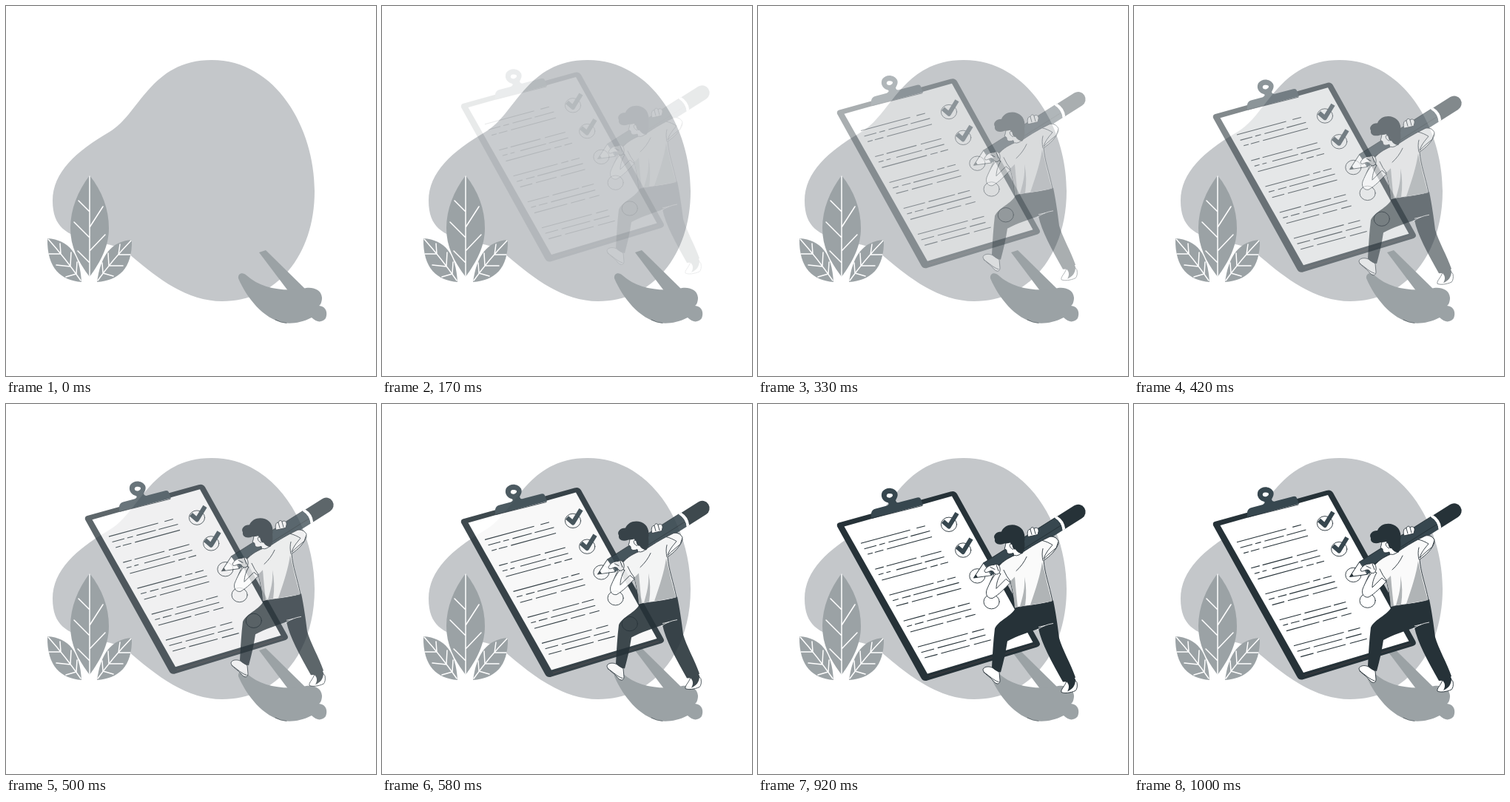
Recreate the animation shown at these times as an HTML page. Size 500 by 500 pixels, loop 1040 ms.

```html
<!DOCTYPE html>
<html lang="en">
<head>
<meta charset="utf-8">
<title>Checklist</title>
<style>
html, body { margin: 0; height: 100%; overflow: hidden; background: #fff; }
svg { display: block; width: 100%; height: 100%; }
.ink { fill: #263238; }
.slate { fill: #37474f; }
.leaf { fill: #9ba2a5; }
.vein { fill: none; stroke: #fff; stroke-width: 1.5; stroke-linecap: round; }
.line { fill: none; stroke: #263238; stroke-width: .9; stroke-linecap: round; stroke-linejoin: round; }
.skin { fill: #fff; stroke: #263238; stroke-width: .9; stroke-linejoin: round; }
.shade { fill: #b0b4b6; }
</style>
</head>
<body>
<svg viewBox="0 0 500 500">
  <path fill="#c4c7ca" d="M278 73C365 73 417 165 417 250C417 338 365 399 292 399C245 399 205 368 172 340C155 324 140 322 115 318C82 309 63 299 63 263C63 225 95 196 140 170C180 147 195 73 278 73Z"/>

  <g class="leaf">
    <path d="M113 229C130 250 139 275 139 300C139 325 128 345 113 366C97 345 87 325 87 300C87 275 97 250 113 229Z"/>
    <path d="M56 314C85 316 100 335 102 373C75 371 55 355 56 314Z"/>
    <path d="M170 316C142 318 128 337 123 373C152 371 171 355 170 316Z"/>
    <path d="M342 333L351 330L405 383L382 386Z"/>
    <path d="M314 368C313 361 320 359 325 364C345 382 375 386 402 382C410 379 426 381 427 394C427 400 425 404 423 405C433 406 435 415 432 422C427 428 420 428 413 421C400 428 385 430 375 428C348 423 325 394 314 368Z"/>
  </g>
  <path class="line" d="M364 424Q371 428 379 428.500" style="stroke-width:.5"/>
  <g class="vein">
    <path d="M113 230V366M98 263L113 278M92 292L113 313M97 331L113 347M131 271L113 299M134 309L113 331"/>
    <path d="M57 315Q81 342 101 371M73 321L74 335M88 333L87 351M96 346L95 362M58 335L74 335M68 350L87 352M81 366L95 362"/>
    <path d="M169 317Q144 343 124 371M154 322L152 336M138 334L139 351M130 347L131 361M168 336L152 336M158 351L139 351M145 365L131 361"/>
  </g>

  <g class="drop">
    <path class="ink" d="M109 159L260 117Q266 115 269 120L380 320Q383 325 377 327L229 372Q223 374 220 368L107 164Q106 160 109 159Z"/>
    <path fill="#fff" d="M116.500 164L262 123L371.500 320.500L229 363Z"/>
    <path d="M231 367L374 324" fill="none" stroke="#4a4346" stroke-width=".7"/>
    <path class="slate" fill-rule="evenodd" d="M153 153L153 146Q154 141 159 140L174 136Q178 134 176 132C168 130 165 123 168 117C173 110 184 111 188 118C190 123 187 126 186 129Q187 133 192 131L215 125Q219 124 220 127L223 135ZM175 120C172 123 175 126 179 125C184 123 183 118 175 120Z"/>
    <path class="line" d="M154 153L222 136"/>
    <g id="rows" class="line"></g>
    <g id="rings" class="line"></g>
    <g fill="none" stroke="#37474f" stroke-width="6" stroke-linejoin="round">
      <path id="tick" d="M250 157L258 164L269 146"/>
      <use href="#tick" x="19" y="34.500"/>
    </g>
  </g>

  <g class="drop">
    <g transform="translate(291.500 233.500) rotate(-32.300)">
      <path class="skin" d="M0 0L22 -10V10Z"/>
      <path class="ink" d="M0 0L5 -2.300V2.300ZM138 -10H167A10 10 0 0 1 167 10H138Q143 0 138 -10Z"/>
      <path class="slate" d="M21 -10H136Q141 0 136 10H21Q25 5 21 2Q24 -4 21 -10Z"/>
      <path class="line" d="M24 3H137M22 -10H136"/>
      <path fill="#fff" d="M136 -10H140Q145 0 140 10H136Q141 0 136 -10Z"/>
    </g>

    <path class="skin" d="M365 178C363 172 365 167 368 168C369 164 373 165 373 167C376 164 380 167 379 171L378 175Z"/>
    <path class="line" d="M368 168L370 175M373 167L375 174"/>

    <path class="skin" d="M336 183C334 188 335 190 333 194L336 196C336 201 339 202 345 200L347 208L360 202L356 180Z"/>
    <path class="skin" d="M425 367L431 375C432 380 431 384 429 386C422 389 414 390 410 388C409 384 414 381 417 373Z"/>
    <path class="ink" d="M416 373L427 367L429 371C429 379 425 384 418 387C421 382 421 377 416 373Z"/>
    <path class="skin" d="M317 355C311 352 304 354 304 358C306 364 313 366 319 374C323 378 327 377 327 372L326 361Z"/>
    <path class="line" d="M305 361C313 366 318 372 325 374"/>

    <path class="ink" d="M348 274C343 285 325 291 320 302C318 318 317 336 316 354Q321 360 328 361C332 346 335 333 337 319C350 312 366 307 379 302C383 322 397 347 412 374Q421 374 429 368C423 350 411 330 407 315C405 298 402 278 399 264Z"/>
    <path d="M377 304Q386 297 399 295M379 300L388 298" fill="none" stroke="#fff" stroke-width=".8"/>

    <path class="skin" style="fill:#fafafa" d="M347 203C337 207 328 213 323 221C318 229 313 240 311 248L322 256L341 238C344 250 346 262 347 274C362 271 381 270 398 265C394 245 387 226 386 210C395 204 403 196 406 187C406 181 400 176 394 178C381 184 368 192 359 198Q351 205 347 203Z"/>
    <path class="shade" d="M341 238L347 232Q349 256 351 273L347 274Q346 255 341 238ZM360 232C361 248 358 258 354 272L361 271Q364 250 360 232ZM384 212C381 232 376 246 368 270L397 265Q390 240 384 212Z"/>
    <path class="line" d="M341 238Q336 232 332 223M385 210Q383 201 385 194M363 205Q358 216 349 224"/>
    <path class="skin" d="M386 208C392 202 398 197 403 193L406 184C404 179 399 177 394 178L384 183C389 184 395 187 398 189C392 196 388 201 386 208Z"/>

    <path class="skin" d="M323 226C317 233 313 240 309 250C307 257 311 262 317 261C326 256 333 248 341 240L335 235L322 248C322 240 325 233 328 228Z"/>
    <path class="skin" d="M306 224C309 218 314 216 319 216C323 213 328 217 327 224C326 230 320 230 318 225C314 222 311 227 307 226Z"/>
    <path class="line" d="M314 219L320 222M322 216L325 224"/>

    <path class="ink" d="M333 187C325 190 319 187 320 181C317 176 322 171 329 171C332 163 342 160 350 163C359 166 362 176 360 184C361 191 360 197 357 201Q351 200 348 195C345 196 343 191 341 186Q337 187 333 187Z"/>
    <path class="skin" d="M343 188C339 186 339 193 345 195"/>
  </g>
</svg>
<script>
const LOOP = 1040, FPS = 24, DROP = 30;
const SVG = "http://www.w3.org/2000/svg";
const get = id => document.getElementById(id);

function add(parent, tag, attrs) {
  const el = document.createElementNS(SVG, tag);
  for (const key in attrs) el.setAttribute(key, attrs[key]);
  parent.append(el);
}

// Dash patterns of the three rows in each paragraph
const dashes = [
  ["69 9 12", "17 4 8 5 27 4 27", "7 3 12 5 63"],
  ["12 4 42 6 30", "7 4 6 8 36 4 27", "63 5 10 4 12"],
  ["62 5 10 4 12", "8 5 12 4 64", "17 5 29 6 34"],
  ["30 5 37 4 18", "7 4 12 5 62", "46 5 20 6 14"],
  ["70 6 18", "18 5 40 5 22", "18 5 40 6 24"]
];
dashes.forEach((para, i) => {
  para.forEach((dash, j) => {
    const x = 139 + 19.25 * i + 4.6 * j, y = 186.8 + 35 * i + 7.4 * j;
    add(get("rows"), "path", {
      d: `M${x} ${y}l89.5 -24.3`, "stroke-dasharray": dash + " 99", "stroke-linecap": "butt", "stroke-width": 1.1
    });
  });
  add(get("rings"), "ellipse", { cx: 258 + 19.2 * i, cy: 161.3 + 34.8 * i, rx: 10.6, ry: 9.7 });
});

const curve = (s, a, b) => 3 * a * s * (1 - s) ** 2 + 3 * b * s * s * (1 - s) + s ** 3;

// cubic-bezier(.36, -.01, .5, 1.38)
function ease(x) {
  let lo = 0, hi = 1;
  for (let i = 0; i < 30; i++) {
    const mid = (lo + hi) / 2;
    if (curve(mid, .36, .5) < x) lo = mid; else hi = mid;
  }
  return curve(lo, -.01, 1.38);
}

const groups = document.querySelectorAll(".drop");
const start = performance.now();

function draw() {
  const t = (performance.now() - start) % LOOP;
  const step = Math.floor((t + 4) * FPS / 1000);
  const p = step < 2 ? 0 : ease(Math.min(1, step / FPS));
  for (const g of groups) {
    g.setAttribute("transform", `translate(0 ${DROP * (p - 1)})`);
    g.setAttribute("opacity", Math.max(0, Math.min(1, p)));
  }
  requestAnimationFrame(draw);
}
draw();
</script>
</body>
</html>
```
